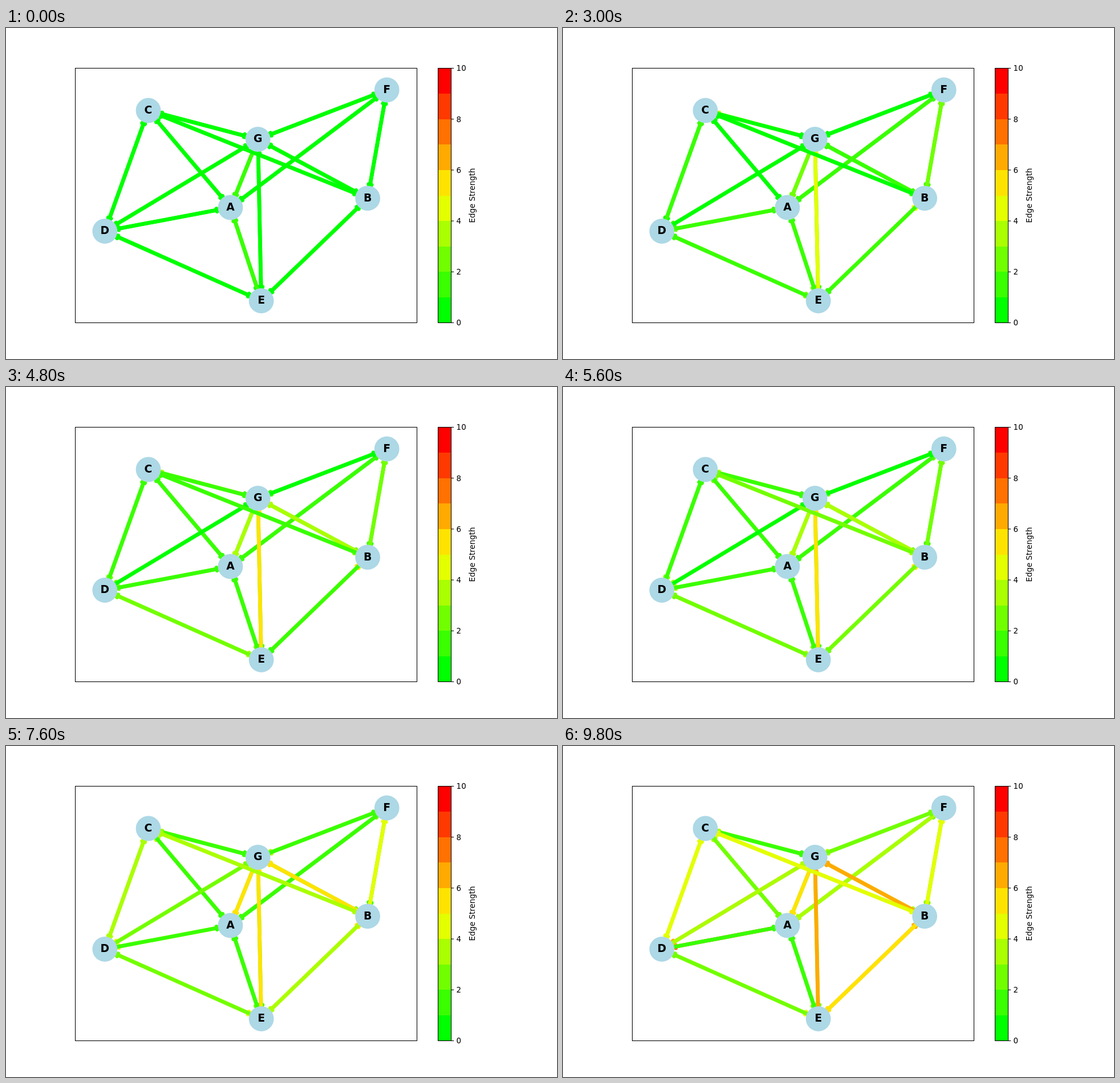
An HTML page that plays this animation: 966 by 580 pixels, repeating every 10 s.

```html
<!DOCTYPE html>
<html lang="en">
<head>
<meta charset="utf-8">
<title>Edge strength graph</title>
<style>
  html, body { margin: 0; width: 100%; height: 100%; overflow: hidden; background: #fff; }
  svg { display: block; width: 966px; height: 580px; }
  text { font: 13.43px "DejaVu Sans", sans-serif; }
  #nodes text { font-weight: bold; font-size: 18.8px; text-anchor: middle; }
  #edges { fill: none; stroke-width: 6.71; stroke-linecap: round; stroke-linejoin: round; }
  .outline { fill: none; stroke: #000; stroke-width: 1.07; }
</style>
</head>
<body>
<svg viewBox="0 0 966 580">
  <rect class="outline" x="121.5" y="70.5" width="599" height="446"/>
  <g id="edges"></g>
  <g id="nodes"></g>
  <g id="bar"></g>
  <rect class="outline" x="757.5" y="70.5" width="23" height="446"/>
  <text transform="translate(821.5 293.5) rotate(-90)" text-anchor="middle">Edge Strength</text>
</svg>
<script>
const LOOP = 10000, STEP = 200;
const RADIUS = 21.9, MARGIN = 11.63, TIP = 19.13, HEAD = 5.37, HALF = 2.69;

const nodes = {
  A: [393.5, 314.5], F: [667.7, 108.5], G: [441.7, 195], C: [249.5, 144.5],
  D: [173.3, 356], E: [447.6, 478], B: [634.1, 298.3]
};

// For each directed edge: the steps at which its strength rises by one level.
const rises = {
  AF: [4, 27], AG: [7, 26], AC: [22, 27, 35], AD: [10, 14, 26, 35, 40, 43, 47],
  AE: [3, 13],
  FA: [10, 41, 46], FG: [21, 26, 36], FB: [6, 45],
  GA: [0, 12, 18, 30, 34], GF: [29, 40], GC: [7, 11, 14], GD: [15, 24, 27, 33, 42, 45],
  GE: [15, 43], GB: [13, 19, 40],
  CA: [24, 49], CG: [23], CD: [20, 23, 37, 42], CB: [12, 17, 27, 43],
  DA: [14], DG: [30, 36, 44], DC: [4, 29, 37, 41], DE: [7, 11, 17, 29],
  EA: [0], EG: [3, 6, 11, 14, 24, 44], ED: [6, 22], EB: [2, 5, 7, 13, 19, 44],
  BF: [5, 14, 30, 37], BG: [11, 16, 18, 31, 36, 45], BC: [19, 25, 34, 43],
  BE: [12, 25, 33, 41, 49]
};

function levelColor(level) {
  const ramp = k => Math.round(255 * Math.min(1, k / 4.5));
  return `rgb(${ramp(level)},${ramp(9 - level)},0)`;
}

function add(parent, tag, attrs, text = "") {
  const el = document.createElementNS("http://www.w3.org/2000/svg", tag);
  for (const key in attrs) el.setAttribute(key, attrs[key]);
  el.textContent = text;
  document.getElementById(parent).append(el);
  return el;
}

// A shaft up to the arrow tip, plus a small closed head.
function arrowPath([x0, y0], [x1, y1]) {
  const length = Math.hypot(x1 - x0, y1 - y0);
  const ux = (x1 - x0) / length, uy = (y1 - y0) / length;
  const at = (along, side) =>
    `${(x0 + ux * along - uy * side).toFixed(2)} ${(y0 + uy * along + ux * side).toFixed(2)}`;
  const tip = length - TIP, base = tip - HEAD;
  return `M${at(MARGIN, 0)}L${at(tip, 0)}M${at(base, HALF)}L${at(tip, 0)}L${at(base, -HALF)}Z`;
}

const edges = Object.entries(rises).map(([[from, to], steps]) => ({
  steps, path: add("edges", "path", { d: arrowPath(nodes[from], nodes[to]) })
}));

for (const [label, [cx, cy]] of Object.entries(nodes)) {
  add("nodes", "circle", { cx, cy, r: RADIUS, fill: "lightblue" });
  add("nodes", "text", { x: cx, y: cy + 5.2 }, label);
}

for (let level = 0; level < 10; level++) {
  const y = 516.5 - 44.6 * (level + 1);
  add("bar", "rect", {
    x: 757.5, y, width: 23, height: 44.6, fill: levelColor(level), "shape-rendering": "crispEdges"
  });
}
for (let value = 0; value <= 10; value += 2) {
  const y = 516.5 - 44.6 * value;
  add("bar", "path", { class: "outline", d: `M780.5 ${y}h4.7` });
  add("bar", "text", { x: 789.6, y: y + 4.9 }, value);
}

let shown = -1;
function draw() {
  const step = Math.floor(performance.now() % LOOP / STEP);
  if (step !== shown) {
    shown = step;
    for (const { steps, path } of edges) {
      path.setAttribute("stroke", levelColor(steps.filter(s => s <= step).length));
    }
  }
  requestAnimationFrame(draw);
}
draw();
</script>
</body>
</html>
```
